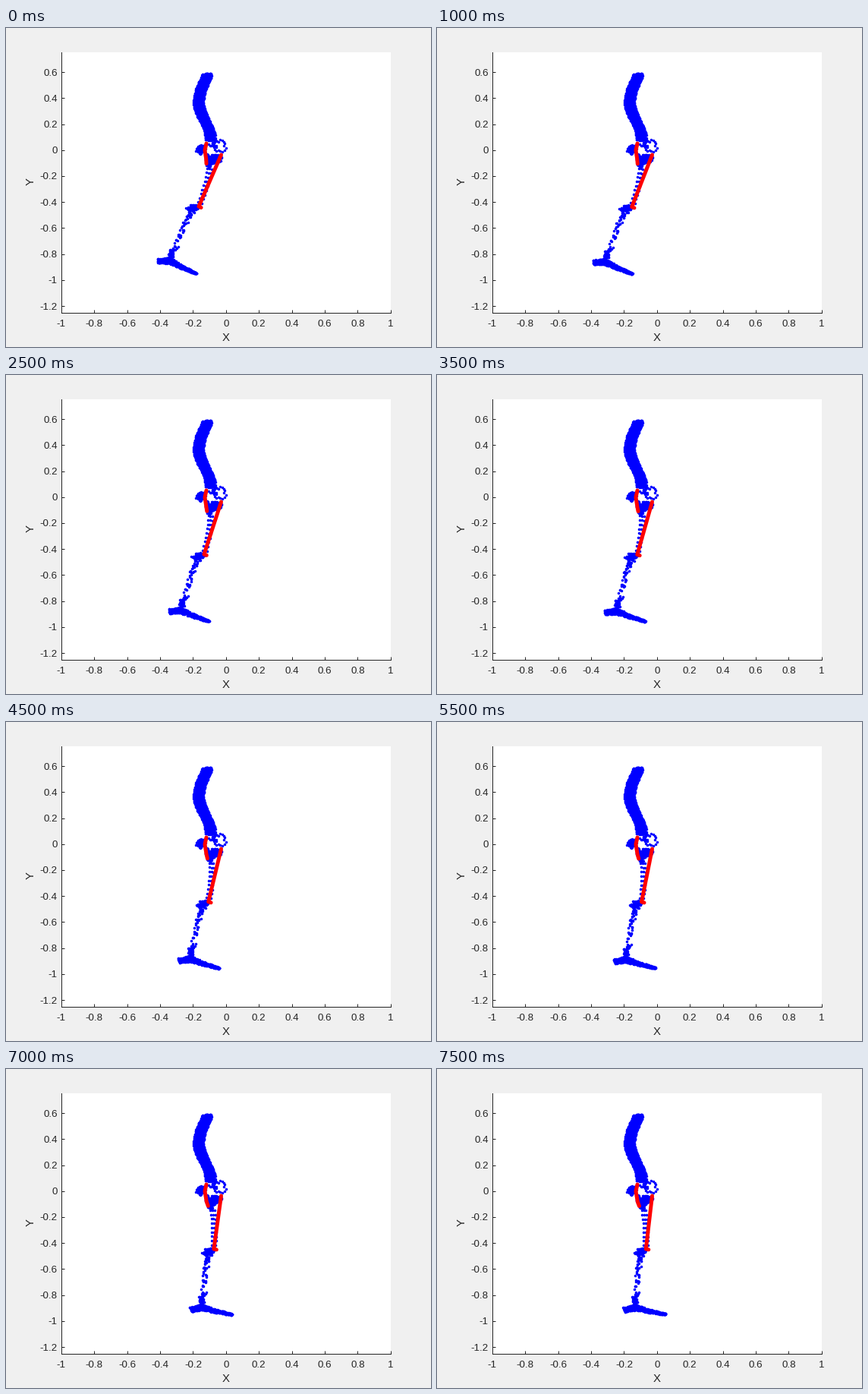
Recreate the animation shown at these times as a matplotlib script. Size 560 px wide and 420 px high, loop 8 s.

```python
import numpy as np
import matplotlib.pyplot as plt
from matplotlib.animation import FuncAnimation

W, H, DPI = 560, 420, 100
FRAMES, INTERVAL = 16, 500
PT = 72 / DPI  # points per pixel
INK = "#262626"
LEFT, BOTTOM, WIDE, HIGH = 72.8, 45.3, 434, 342.3  # axes box in pixels
HIP = np.array([-0.0707, -0.0661])

plt.rcParams["font.family"] = "Liberation Sans"
plt.rcParams["axes.unicode_minus"] = False
rng = np.random.default_rng(7)


def to_data(points):
    """Stage pixels to axis units."""
    x, y = np.asarray(points, float).T
    return np.column_stack(((x - LEFT) / WIDE * 2 - 1,
                            (H - y - BOTTOM) / HIGH * 2 - 1.25))


def strand(n, *nodes):
    """Scatter n dots around a path of (x, y, radius) nodes."""
    t = rng.uniform(0, len(nodes) - 1, n)
    x, y, r = (np.interp(t, range(len(nodes)), c) for c in zip(*nodes))
    a = rng.uniform(0, 2 * np.pi, n)
    r = r * rng.uniform(0, 1, n) ** 0.4
    return np.column_stack((x + r * np.cos(a), y + r * np.sin(a)))


def spine(n):
    """S-shaped column, its curve a little slacker at the top."""
    y = rng.uniform(59.5, 148, n)
    period = np.where(y < 97, 110, 98)
    x = 261.6 - 7.7 * np.cos(2 * np.pi * (y - 97) / period)
    return np.column_stack((x + rng.uniform(-6.8, 6.8, n), y))


def ring(n, x, y, r):
    a = np.linspace(0, 2 * np.pi, n, endpoint=False)
    r = r + rng.normal(0, 1.2, n)
    return np.column_stack((x + r * np.cos(a), y + r * np.sin(a)))


def shaft(rows):
    """Bowed long bone: rows of three dots."""
    t = np.linspace(0, 1, rows)
    x = 272.5 + 2.5 * t + 1.2 * np.sin(np.pi * t)
    return np.vstack([np.column_stack((x + d, 186 + 46 * t))
                      for d in (-2.8, 0, 2.8)])


def swing(points, degrees):
    a = np.radians(degrees)
    c, s = np.cos(a), np.sin(a)
    return (points - HIP) @ np.array([[c, s], [-s, c]]) + HIP


torso = to_data(np.vstack((
    spine(1500),
    strand(110, (254, 161, 5), (260, 157, 4.5)),  # sacrum
    strand(20, (264, 166, 2), (264, 177, 2)),
    strand(60, (270, 172, 5), (281, 171, 4)),
    strand(14, (268, 150, 4), (276, 154, 4)),
    ring(18, 281, 155, 8))))

# Leg in its final pose
leg = to_data(np.vstack((
    strand(150, (279, 171, 5), (271, 173, 5.5), (270, 181, 4)),  # hip joint
    shaft(9),
    strand(110, (273, 238, 3), (264, 242, 5.5)),  # knee
    strand(24, (268, 246, 5), (265, 261, 4)),
    strand(26, (264.5, 262, 3.5), (263, 296, 3.5)),  # shin
    strand(40, (260.5, 298, 4), (260, 309, 5)),  # ankle
    strand(480, (246.5, 317, 3), (262, 313.8, 3.6),
           (281, 318.8, 2.3), (301, 323, 0.8)))))  # foot

# Muscles: points on the pelvis, then points carried by the leg
glute = (to_data([(264, 152), (262, 161)]),
         to_data([(264.4, 175), (266.5, 180.5)]))
thigh = (to_data([(283.5, 167)]),
         to_data([(275.3, 237), (278.8, 237.8)]))

fig = plt.figure(figsize=(W / DPI, H / DPI), dpi=DPI, facecolor="#f0f0f0")
ax = fig.add_axes([LEFT / W, BOTTOM / H, WIDE / W, HIGH / H])
ax.set(xlim=(-1, 1), ylim=(-1.25, 0.75))
for side in ("top", "right"):
    ax.spines[side].set_visible(False)
for side in ("left", "bottom"):
    ax.spines[side].set(color=INK, linewidth=PT)

xt = np.arange(-5, 6) / 5
yt = np.arange(-6, 4) / 5
ax.set_xticks(xt, [f"{v:g}" for v in xt])
ax.set_yticks(yt, [f"{v:g}" for v in yt])
ax.tick_params(direction="in", length=4.3 * PT, width=PT, color=INK,
               labelcolor=INK, labelsize=13.33 * PT)
ax.tick_params(axis="x", pad=9 * PT)
ax.tick_params(axis="y", pad=5 * PT)

label = dict(ha="center", va="center", color=INK, fontsize=15 * PT)
fig.text(290 / W, 1 - 408 / H, "X", **label)
fig.text(33 / W, 1 - 201.5 / H, "Y", rotation=90, **label)

dots = dict(ls="", marker="o", ms=3.5 * PT, mew=0, color="#0000ff")
cord = dict(color="#ff0000", lw=5 * PT, solid_capstyle="round",
            solid_joinstyle="round", zorder=3)
ax.plot(*torso.T, **dots)
leg_dots, = ax.plot([], [], **dots)
cords = [ax.plot([], [], **cord)[0] for _ in range(2)]


def update(i):
    angle = i - (FRAMES - 1)  # one degree per step
    leg_dots.set_data(*swing(leg, angle).T)
    for line, (fixed, moving) in zip(cords, (glute, thigh)):
        line.set_data(*np.vstack((fixed, swing(moving, angle))).T)
    return [leg_dots, *cords]


anim = FuncAnimation(fig, update, frames=FRAMES, interval=INTERVAL,
                     repeat=True, repeat_delay=0)
plt.show()
```
